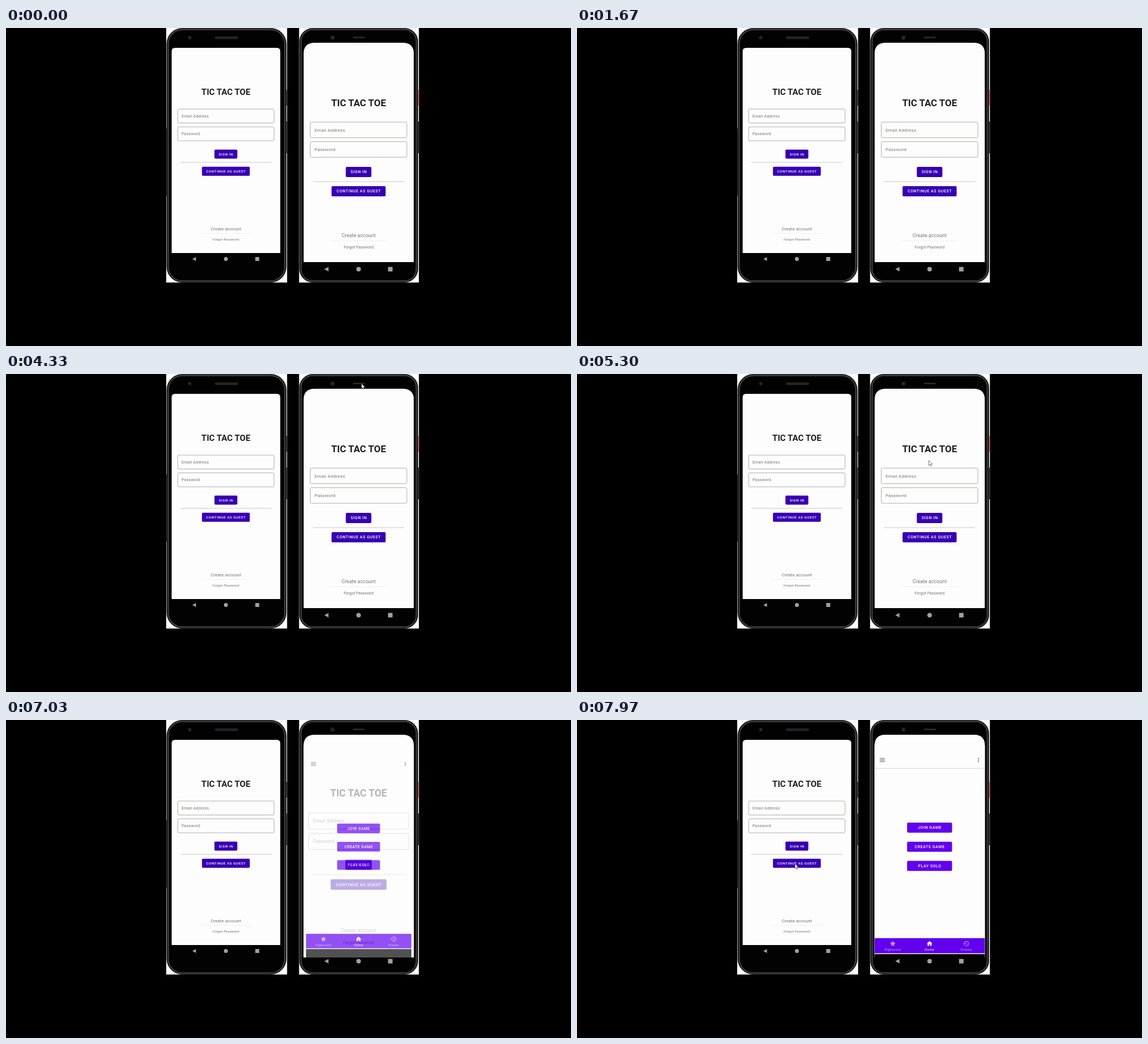
These frames come from a looping animation (998 px wide and 561 px high, 8 s). An HTML page:

```html
<!DOCTYPE html>
<html lang="en">
<head>
<meta charset="utf-8">
<title>Tic Tac Toe sign-in</title>
<style>
  html, body { margin: 0; width: 100%; height: 100%; overflow: hidden; background: #000; }
  svg { display: block; width: 100vw; height: 100vh; }
  text { font-family: Roboto, sans-serif; }
</style>
</head>
<body>
<svg id="stage" viewBox="0 0 998 561"></svg>
<script>
const LOOP = 8000;
const OPEN_AT = 6955, OPEN_FOR = 400;
const PAPER = '#fdfdfd', INDIGO = '#3700b3', PURPLE = '#6200ee', GREY = '#757575';

const rect = (x, y, x2, y2, fill, r = 0, extra = '') =>
  `<rect x="${x}" y="${y}" width="${x2 - x}" height="${y2 - y}" rx="${r}" fill="${fill}" ${extra}/>`;
const line = (x, x2, y, color, w = 1) =>
  `<path d="M${x} ${y}H${x2}" stroke="${color}" stroke-width="${w}"/>`;
const circle = (x, y, r, fill) => `<circle cx="${x}" cy="${y}" r="${r}" fill="${fill}"/>`;

// Text whose capitals are centred on y
function label(x, y, size, str, fill, { anchor = 'middle', weight = 400, space = 0 } = {}) {
  return `<text x="${x}" y="${y + size * 0.355}" font-size="${size}" fill="${fill}" text-anchor="${anchor}"
    font-weight="${weight}" letter-spacing="${space * size}">${str}</text>`;
}

// k is the size of one dp on the phone
function button(cx, y, w, h, k, str, fill) {
  return rect(cx - w / 2, y - h / 2, cx + w / 2, y + h / 2, fill, 4 * k) +
    label(cx + 0.6 * k, y, 14 * k, str, '#fff', { weight: 500, space: 0.089 });
}

function field(x, x2, y, h, k, str) {
  return rect(x, y - h / 2, x2, y + h / 2, 'none', 4 * k, 'stroke="#a5a5a0" stroke-width=".9"') +
    label(x + 16 * k - 0.5, y, 16 * k, str, GREY, { anchor: 'start', space: 0.033 });
}

function login(p) {
  const { cx, k, y } = p;
  return label(cx, y.title, 34 * k, 'TIC TAC TOE', '#1f1f1f', { weight: 700 }) +
    field(p.fx, p.fx2, y.email, p.fh, k, 'Email Address') +
    field(p.fx, p.fx2, y.pass, p.fh, k, 'Password') +
    button(cx, y.sign, 91 * k, 36 * k, k, 'SIGN IN', INDIGO) +
    line(cx - 80.5, cx + 80.5, y.rule, '#c6c6c0') +
    button(cx, y.guest, p.gw, 36 * k, k, 'CONTINUE AS GUEST', INDIGO) +
    label(cx, y.create, 18 * k, 'Create account', GREY) +
    line(cx - 104 * k, cx + 104 * k, y.thin, '#f0f0ee') +
    label(cx, y.forgot, 14 * k, 'Forgot Password', GREY);
}

function body(x, x2, r) {
  return rect(x, 0.5, x2, 448.5, '#151517', r, 'stroke="#3a3a3e"') +
    rect(x + 3, 3, x2 - 3, 446, '#000', r - 3, 'stroke="#505054" stroke-width="1.4"') +
    rect(x + 5.5, 5.5, x2 - 5.5, 443.5, '#020203', r - 5);
}

function navKeys(xs, y, s) {
  const [a, b, c] = xs, ink = '#a0a0a0';
  return `<path d="M${a - s} ${y}L${a + s * 0.85} ${y - s}V${y + s}Z" fill="${ink}"/>` +
    circle(b, y, s, ink) + rect(c - s, y - s, c + s, y + s, ink, 0.5);
}

const screenPath = (x, y, x2, y2, r) =>
  `M${x} ${y2}V${y + r}Q${x} ${y} ${x + r} ${y}H${x2 - r}Q${x2} ${y} ${x2} ${y + r}V${y2}Z`;

const small = {
  cx: 388.4, k: 0.444, fx: 303.3, fx2: 473.4, fh: 24.6, gw: 84.5,
  y: { title: 113, email: 155.3, pass: 186.7, sign: 222.4, rule: 237, guest: 252.8, create: 354, thin: 362.5, forgot: 373 }
};
const large = {
  cx: 622.8, k: 0.496, fx: 537.5, fx2: 708, fh: 27.4, gw: 95.5,
  y: { title: 132.3, email: 179.7, pass: 214.3, sign: 254, rule: 271, guest: 288, create: 365.7, thin: 375.5, forgot: 387 }
};

const ICONS = {
  star: 'M12 17.3L18.2 21l-1.7-7L22 9.2l-7.2-.6L12 2 9.2 8.6 2 9.2l5.5 4.8L5.8 21z',
  home: 'M10 20v-6h4v6h5v-8h3L12 3 2 12h3v8z',
  clock: 'M13 3a9 9 0 0 0-9 9H1l4 4 4-4H6a7 7 0 1 1 2 4.9l-1.4 1.5A9 9 0 1 0 13 3zm-1 5v5l4.3 2.5.7-1.2-3.5-2V8z'
};

function tab(x, icon, str, fill) {
  return `<path transform="translate(${x - 6} 388.5) scale(.496)" d="${ICONS[icon]}" fill="${fill}"/>` +
    label(x, 405.2, 5.95, str, fill, { space: 0.04 });
}

function home() {
  const { cx, k } = large, pale = '#c6a5f8';
  const bars = [67.8, 70.6, 73.4].map(y => line(534.6, 543.8, y, '#555') + circle(709.3, y, 0.95, '#555')).join('');
  const games = ['JOIN GAME', 'CREATE GAME', 'PLAY SOLO']
    .map((s, i) => button(cx, 189.8 + i * 33.8, 79.4, 17.8, k, s, PURPLE)).join('');
  return rect(525.5, 26, 720.5, 413, PAPER) + rect(525.5, 413, 720.5, 439, '#000') +
    bars + `<g id="shade">${line(525.5, 720.5, 85.3, '#d6d6d2')}</g>` + games +
    rect(525.5, 384.8, 720.5, 411.6, PURPLE) +
    tab(557.8, 'star', 'Highscore', pale) + tab(cx, 'home', 'Home', '#fff') + tab(687.6, 'clock', 'History', pale);
}

document.getElementById('stage').innerHTML = `
  <clipPath id="view"><path d="${screenPath(525.5, 26, 720.5, 419, 20)}"/></clipPath>
  ${rect(283, 0, 496.5, 449, '#fff')}
  ${rect(494, 109, 496.5, 137, '#18181a')}${rect(494, 165, 496.5, 221, '#18181a')}
  ${rect(283, 177, 285, 205, '#18181a')}${rect(283, 205, 285, 296, '#18181a')}
  ${body(284, 495, 27)}
  ${circle(324.5, 17, 3, '#26262a')}${rect(369, 14.8, 410, 19.4, '#242428', 2)}
  <path d="${screenPath(292.6, 35, 484.4, 397, 6)}" fill="${PAPER}"/>
  ${login(small)}
  ${navKeys([332.6, 388.4, 443.8], 407.4, 3.5)}
  ${rect(517.7, 0, 729.3, 449, '#fff')}
  ${rect(726, 109, 729.3, 137, '#f0583c')}${rect(726, 165, 729.3, 221, '#18181a')}
  ${body(518.5, 727.5, 23)}
  ${circle(576.7, 17, 4, '#1c1c20')}${circle(576.7, 17, 1.8, '#303036')}${rect(612.5, 15.2, 634, 18, '#2a2a2c', 1.4)}
  <g clip-path="url(#view)">
    <g id="login">${rect(525.5, 26, 720.5, 413, PAPER)}${login(large)}</g>
    <g id="home">${home()}</g>
  </g>
  ${navKeys([566.2, 622.8, 678.8], 425.5, 4)}
  <path id="cursor" d="M0 0V8.6L2 6.8 3.5 10 5 9.3 3.6 6.3H6.2Z" fill="#fff" stroke="#222" stroke-width=".6"/>`;

const el = Object.fromEntries(['login', 'home', 'shade', 'cursor'].map(id => [id, document.getElementById(id)]));
const clamp = v => Math.max(0, Math.min(1, v));
const ease = u => u * u * (3 - 2 * u);

// Pointer stops: time, x, y
const STOPS = [[2000, 628, 17], [4950, 628, 17], [5650, 615, 287], [7250, 506, 270], [7750, 385, 253.5], [8000, 385, 253.5]];

function pointer(t) {
  if (t < 2000 || (t > 6950 && t < 7250)) return null;
  if (t > 5650 && t < 7000) return [615, 287];
  const i = STOPS.findIndex(s => s[0] > t);
  const a = STOPS[i - 1], b = STOPS[i];
  const u = ease((t - a[0]) / (b[0] - a[0]));
  return [a[1] + (b[1] - a[1]) * u, a[2] + (b[2] - a[2]) * u];
}

const zoom = s => `translate(622.8 220) scale(${s}) translate(-622.8 -220)`;

function draw(t) {
  const age = t - OPEN_AT;
  const p = 1 - Math.pow(1 - clamp(age / OPEN_FOR), 5.6);
  el.login.setAttribute('transform', zoom(1 + 0.05 * p));
  el.home.setAttribute('transform', zoom(0.85 + 0.15 * p));
  el.home.setAttribute('opacity', clamp((age - 35) / 60));
  el.shade.setAttribute('opacity', clamp((age - 200) / 150));
  const at = pointer(t);
  el.cursor.setAttribute('visibility', at ? 'visible' : 'hidden');
  if (at) el.cursor.setAttribute('transform', `translate(${at})`);
}

const start = performance.now();
function tick() {
  draw((performance.now() - start) % LOOP);
  requestAnimationFrame(tick);
}
tick();
</script>
</body>
</html>
```
